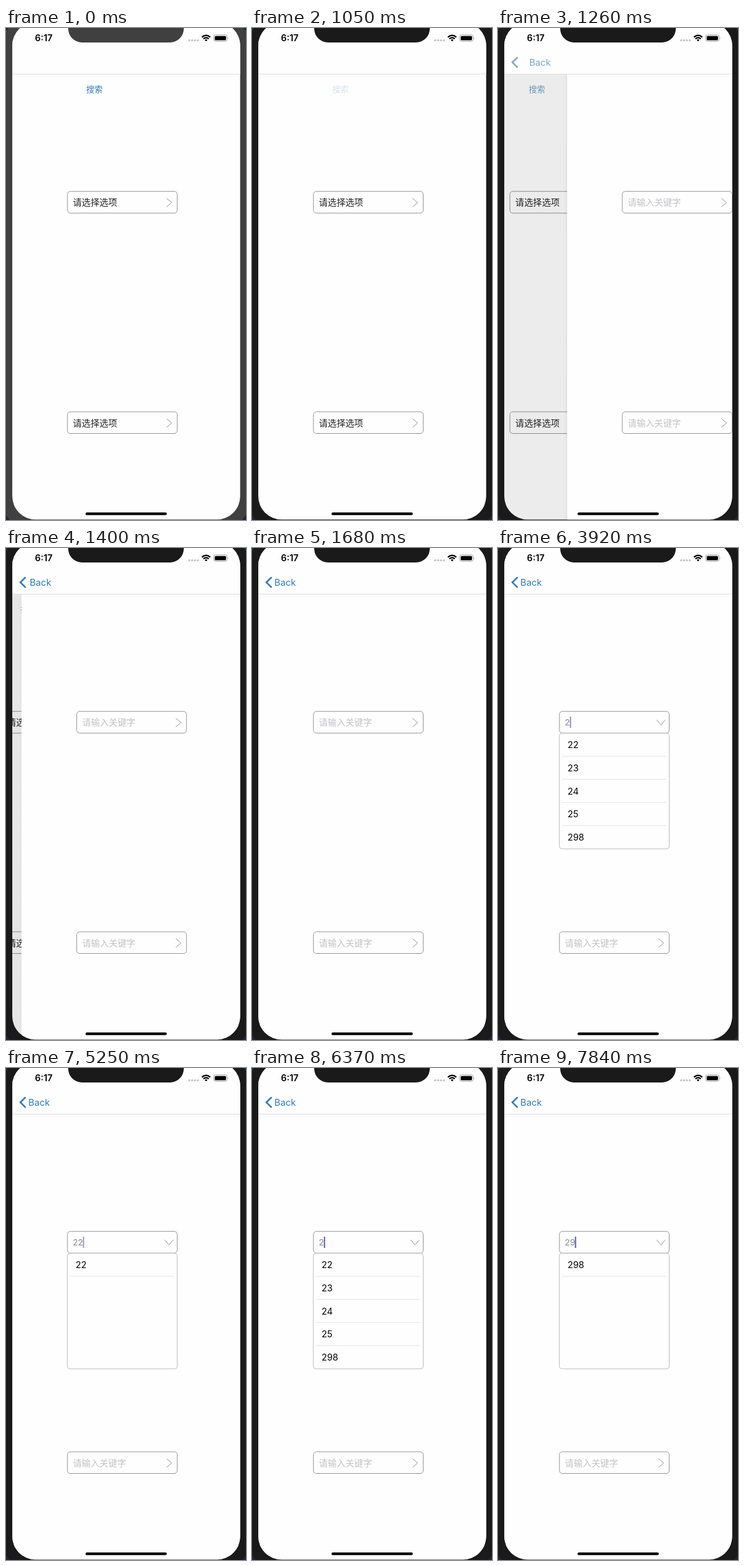
Animation of 382 by 782 pixels, one loop 8 s. Source, as an HTML page:

```html
<!DOCTYPE html>
<html lang="zh">
<head>
<meta charset="utf-8">
<title>Search dropdown</title>
<style>
  html, body { margin: 0; width: 100%; height: 100%; overflow: hidden; background: #fff; }
  svg { display: block; width: 382px; height: 782px; }
  text { font-family: Inter, "Noto Sans CJK SC", "Noto Sans CJK", sans-serif; white-space: pre; }
  .cjk { font-family: "Noto Sans CJK SC", "Noto Sans CJK", sans-serif; font-size: 14.1px; font-weight: 300; }
  .line { fill: none; stroke: #959595; stroke-width: 1; }
  .blue { fill: #3579b8; }
</style>
</head>
<body>
<svg viewBox="0 0 382 782">
  <defs>
    <clipPath id="screen"><rect x="10" y="-9" width="362.7" height="790.3" rx="37"/></clipPath>
    <clipPath id="fold"><rect id="foldBox" x="97" y="294" width="176" height="0"/></clipPath>
    <linearGradient id="edge"><stop offset="0" stop-opacity="0"/><stop offset="1" stop-opacity=".16"/></linearGradient>
  </defs>

  <rect width="382" height="782" fill="#1c2740"/>
  <path id="bezel" d="M4 0H378L382 5V774L376 782H6L0 774V5Z"/>

  <g clip-path="url(#screen)">
    <rect width="382" height="782" fill="#fefefe"/>

    <g id="first">
      <text id="search" class="cjk blue" x="127.8" y="102.2" style="font-size:13px">搜索</text>
      <g id="firstFields"></g>
    </g>
    <rect id="dim" x="10" y="73" width="363" height="709"/>

    <g id="second">
      <rect id="shade" x="5" y="73" width="5" height="709" fill="url(#edge)"/>
      <rect x="10" y="73" width="363" height="709" fill="#fefefe"/>
      <g id="secondFields"></g>
      <text id="typed" x="106.2" y="281.8" font-size="13.5" fill="#8b8b8f"></text>
      <rect id="caret" y="268" width="1.8" height="18" fill="#474fae"/>
      <g clip-path="url(#fold)">
        <g id="rows"></g>
      </g>
      <rect id="list" class="line" x="97.6" y="294.5" width="174.9" height="0" rx="4" style="stroke:#bdbdbd"/>
    </g>

    <rect x="10" y="0" width="363" height="73" fill="#fefefe"/>
    <path d="M10 73.3H373" stroke="#dedede"/>
    <g id="back">
      <path d="M31.2 46.3L22.9 54.6L31.2 62.9" fill="none" stroke="#3579b8" stroke-width="2.6"/>
      <text id="backText" class="blue" x="35.6" y="59.8" font-size="14.7">Back</text>
    </g>

    <text x="60" y="21.3" font-size="14.3" font-weight="600" text-anchor="middle">6:17</text>
    <g id="dots" fill="#c3c3c3"></g>
    <g fill="none" stroke="#000" stroke-width="2.1">
      <path d="M311.8 14.6Q318.5 8.8 325.2 14.6M314.2 17.3Q318.5 13.6 322.8 17.3"/>
      <path d="M316.3 18.9Q318.5 17.2 320.7 18.9L318.5 21.2Z" fill="#000" stroke="none"/>
    </g>
    <rect x="330.5" y="11" width="21.5" height="10.2" rx="3" fill="none" stroke="#a2a2a2"/>
    <rect x="332.2" y="12.7" width="18" height="6.8" rx="1.6"/>
    <path d="M353.2 14.4Q355 16.1 353.2 17.8Z" fill="#a2a2a2"/>
    <rect x="126.5" y="769.9" width="129.5" height="4.4" rx="2.2"/>
  </g>
  <path id="notch" d="M99 0V1A22 22 0 0 0 121 23H261A22 22 0 0 0 283 1V0Z"/>
</svg>

<script>
const LOOP = 8000, STEP = 70, WIDTH = 363;
const $ = id => document.getElementById(id);
const clamp = (v, lo = 0, hi = 1) => Math.min(hi, Math.max(lo, v));
const set = (id, attrs) => {
  for (const key in attrs) $(id).setAttribute(key, attrs[key]);
};
const shift = (id, x) => set(id, { transform: `translate(${x} 0)` });

const field = (y, label, color, name) => `
  <rect class="line" x="97.8" y="${y}" width="174.7" height="34.5" rx="4.5"/>
  <text class="cjk" id="${name}Label" x="106.5" y="${y + 22.5}" fill="${color}">${label}</text>
  <path class="line" id="${name}Arrow" d="M255.7 ${y + 11}L263.7 ${y + 17.8}L255.7 ${y + 24.6}"/>`;
const fieldPair = (...style) => [259.7, 610].map((y, i) => field(y, ...style.slice(0, 2), style[2] + i)).join('');

$('firstFields').innerHTML = fieldPair('请选择选项', '#222', 'a');
$('secondFields').innerHTML = fieldPair('请输入关键字', '#c3c3c6', 'b');
$('dots').innerHTML = [0, 1, 2, 3].map(i => `<circle cx="${291.6 + i * 4.6}" cy="19.6" r="1.7"/>`).join('');

// [time, text in the field]
const keys = [[2870, ''], [3360, '2'], [4130, '22'], [6370, '2'], [6720, '29']];
const fadeOut = [3920, 4690, 5740, 7280];
const fadeIn = [5250, 6230, 7770];
const items = ['22', '23', '24', '25', '298'];
const lastBefore = (list, t) => Math.max(0, ...list.filter(v => v <= t));

function caretAlpha(t) {
  const key = lastBefore(keys.map(k => k[0]), t);
  const out = lastBefore(fadeOut, t);
  const back = lastBefore(fadeIn, t);
  if (!key) return 0;
  if (key > out && key > back) return 1;
  return out > back ? clamp(1 - (t - out + STEP) / 210) : clamp(0.6 + (t - back) / 140);
}

let shownQuery = null;
function showRows(query) {
  if (query === shownQuery) return;
  shownQuery = query;
  $('typed').textContent = query;
  const found = query ? items.filter(s => s.includes(query)) : [];
  $('rows').innerHTML = found.map((s, i) => {
    const y = 294.5 + i * 36.7;
    return `<text x="110.7" y="${y + 23.6}" font-size="14.3">${s}</text>` +
      (i < 4 ? `<path d="M102 ${y + 36.5}H268" stroke="#e6e6e6"/>` : '');
  }).join('');
}

function draw(time) {
  const t = Math.floor(time / STEP) * STEP;
  const shell = t < 1050 ? '#404040' : '#1a1a1a';
  set('bezel', { fill: shell });
  set('notch', { fill: shell });

  // Critically damped page push
  const x = Math.max(0, t - 1113) * 0.0174;
  const rest = t >= 1680 ? 0 : (1 + x) * Math.exp(-x);
  const done = 1 - rest;
  shift('first', -0.3 * WIDTH * done);
  shift('second', WIDTH * rest);
  shift('backText', 51 * rest);
  set('dim', { opacity: 0.1 * done });
  set('shade', { opacity: rest < 1 ? rest : 0 });
  set('back', { opacity: clamp(done * done * 1.25) });
  set('search', { opacity: t < 1050 ? 1 : clamp(0.2 + (t - 1120) / 280, 0.2) });

  const query = keys.reduce((text, [at, value]) => t >= at ? value : text, '');
  showRows(query);
  set('b0Label', { opacity: query ? 0 : 1 });
  set('caret', { x: 106.5 + query.length * 8, opacity: caretAlpha(t) });

  const p = clamp((t - 3360 + STEP / 2) / 280) * (t >= 3360);
  const open = p * p * (3 - 2 * p);
  set('b0Arrow', { transform: `rotate(${90 * open} 259.7 277.2)` });
  set('foldBox', { height: 184 * open });
  set('list', { height: 183.6 * open, opacity: open ? 1 : 0 });
}

const start = performance.now();
function frame() {
  draw((performance.now() - start) % LOOP);
  requestAnimationFrame(frame);
}
frame();
</script>
</body>
</html>
```
